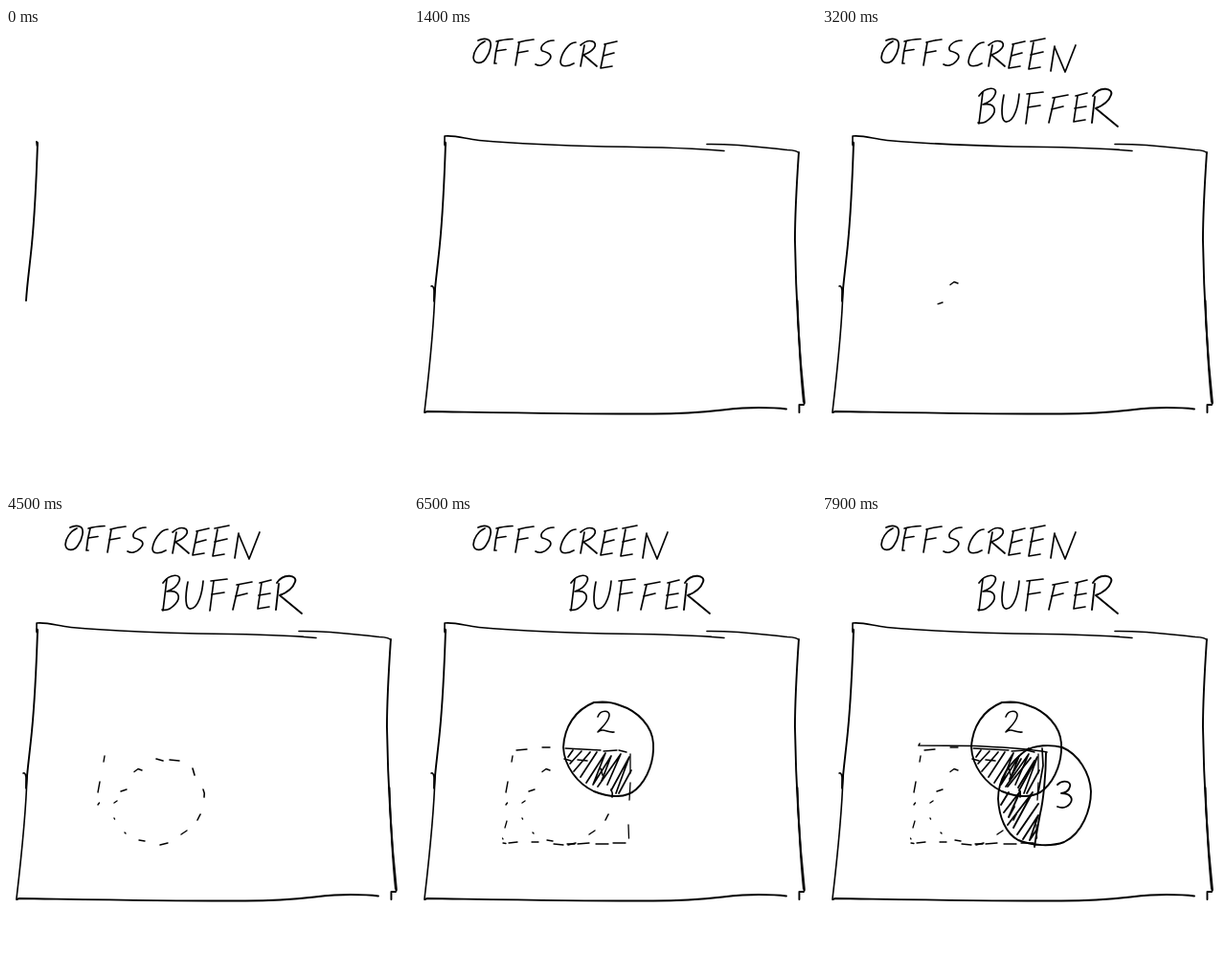
An HTML page for the animation above (8000 ms loop, 420 by 480 pixels).

```html
<!DOCTYPE html>
<html lang="en">
<head>
<meta charset="utf-8">
<title>Offscreen buffer sketch</title>
<style>
  html, body { margin: 0; width: 100%; height: 100%; overflow: hidden; background: #fff; }
  svg { display: block; width: 420px; height: 480px; }
  path { fill: none; stroke: #000; stroke-linecap: round; stroke-linejoin: round; }
</style>
</head>
<body>
<svg id="board" viewBox="0 0 420 480" role="img" aria-label="OFFSCREEN BUFFER"></svg>
<script>
const LOOP = 8000, STEP = 100;

// Each entry: pen down (ms), pen up (ms), line width, strokes in drawing order.
const script = [
  // Frame
  [-100, 0, 1.9, 'M32 119L32.5 123M33 120C32 150 30 195 27 226C25 247 22 268 21 285'],
  [0, 100, 1.6, 'M18 270Q21 269 21 277L21 286M22 272C21 310 16 358 11 401'],
  [100, 200, 1.9, 'M11 402L14 401C80 402 180 404 250 403.500C315 403 325 397 360 397Q378 397 389 398.5'],
  [200, 300, 1.9, 'M402 130C400 160 398 190 398 222C399 280 403 345 408 392L407 394L402.500 394L402.500 402M400.500 285C402 325 404 362 407 391'],
  [300, 400, 1.6, 'M32 122L32 113C45 112 53 116 68 117.500C110 121 155 123 200 124C245 124.500 290 125 324 128.500M306 121.500C340 121 365 125 390 127.500Q401 128 402 131'],
  // First word
  [400, 500, 1.7, 'M74 14C67 17 62 25 62 31C63 38 71 38 75 32C80 25 82 15 78 12.500Q73 10 67 13'],
  [500, 600, 1.7, 'M88 14Q85 25 84 37L86 37M86 14Q93 12 103 11.500M86 24L96 22.500'],
  [600, 700, 1.7, 'M110 15L106 39M109 15Q116 13 125 12M108 26L119 24'],
  [700, 900, 1.7, 'M146 13C137 13 130 20 134 24C142 26 146 29 140 35C136 40 130 40 127 38'],
  [900, 1000, 1.7, 'M169 15C161 15 154 27 153 35C153 42 162 40 167 37'],
  [1000, 1200, 1.7, 'M178 18L174 40M174 18C183 10 193 14 188 21Q184 26 177 28L191 40'],
  [1200, 1400, 1.7, 'M200 17L195 42L207 40M199 17L212 14M198 29L209 26'],
  [1400, 1600, 1.7, 'M221 15L216 43L228 41M218 14L233 11M218 28L231 25'],
  [1600, 1800, 1.7, 'M243 19L239 45M243 20L254 46L265 18'],
  // Second word
  [1800, 1900, 1.7, 'M168 67L164 100M164 71C171 61 184 61 181 69Q178 77 168 80C181 78 183 86 177 93Q170 101 163 99'],
  [1900, 2000, 1.7, 'M190 70C187 85 187 99 193 98C201 97 205 82 206 69'],
  [2000, 2100, 1.7, 'M217 69L213 100M214 69L231 67'],
  [2100, 2200, 1.7, 'M215 83L228 81'],
  [2200, 2400, 1.7, 'M243 73L237 99M241 73L257 70M240 85L252 82'],
  [2400, 2700, 1.7, 'M267 71L263 98L275 96M265 71L277 68M264 84L276 82'],
  [2700, 3000, 1.9, 'M285 72L282 99M283 71C290 60 305 63 302 70Q299 79 286 84L309 103'],
  // Dashed circle
  [3000, 3600, 1.4, 'M142 267L138 265.500L134 268.500M126 287L120 289M116 299L113 301M113 317L113.500 318M124 332L125 333M139 340L145 341M161 345L169 343M183 334L189 330'],
  [3600, 4100, 1.6, 'M200 319L203 313M207 295Q208 291 206 287M197 272L195 265M181 257L171 256M164 257L157 255'],
  // Dashed square
  [4100, 4500, 1.4, 'M102 258L103 252M96 290L98 279M96 303L97.500 301'],
  [4500, 5000, 1.3, 'M95 327L97 320M92.500 338L93 339M93 343L96 343.500M99 343L108 342M123 342L130 342M146 344L156 345M160 344L168 344M171 344L183 343M190 344L203 344M208 343L221 343'],
  [5000, 5400, 1.3, 'M107 246L118 245M134 243L142 243M158 244L195 246M198 247L212 246M214 246L222 248'],
  [5400, 5500, 1.3, 'M226 250L226 270M226 280L225 298M224 324L224.500 338'],
  // First solid circle, its number and shading
  [5500, 5800, 1.9, 'M202 196L188 196C168 204 157 222 156 243C157 263 171 281 188 289C205 296 222 296 232 287C245 275 251 256 250 239C249 221 234 205 215 199Q203 194 189 196'],
  [5800, 6000, 1.6, 'M192 211C195 203 205 204 204 210C203 217 196 222 192 227C198 222 202 228 209 227'],
  [6000, 6500, 1.7, 'M161 253L166 246M163 260L175 247M167 268L184 248M174 274L191 248M180 280L200 249L187 282L206 252L196 278M192 284L216 250L202 282M206 288L225 253L211 291M214 291L227 267'],
  // Second solid circle and its number
  [6500, 6800, 1.9, 'M216 244C196 258 184 275 184 297C185 316 192 333 205 340C220 346 240 347 253 342C272 333 281 308 281 289C280 270 268 250 251 243C240 240 222 240 212 247'],
  [6800, 7000, 1.7, 'M196 276L208 255M230 244L231 262L226 290'],
  [7000, 7200, 1.8, 'M246 282C252 276 261 279 259 284C258 289 253 291 250 291C260 291 263 297 259 302Q254 308 246 305'],
  // Second shading and the corrected edges
  [7200, 7600, 1.9, 'M187 303L195 290M190 311L207 289L195 316L201 305M194 324L220 290L200 327M204 334L226 302M210 339L226 314L217 340L225 328M194 284L218 254M205 285L222 257'],
  [7600, 7700, 1.6, 'M102 239L101 241L160 241.500C190 243 214 244 235 248'],
  [7700, 7900, 1.9, 'M234 249C234 272 231 300 228 312Q224 333 222 347']
];

const board = document.getElementById('board');
const strokes = script.flatMap(([from, to, width, d]) => {
  const parts = d.match(/M[^M]+/g).map(piece => {
    const path = document.createElementNS(board.namespaceURI, 'path');
    path.setAttribute('d', piece);
    path.setAttribute('stroke-width', width);
    board.append(path);
    return { path, length: path.getTotalLength() };
  });
  const total = parts.reduce((sum, p) => sum + p.length, 0);
  let done = 0;
  return parts.map(({ path, length }) => {
    const start = from + (to - from) * done / total;
    done += length;
    return { path, length, start, end: from + (to - from) * done / total };
  });
});

function draw(time) {
  for (const { path, length, start, end } of strokes) {
    const part = Math.min(1, (time - start) / (end - start));
    const full = part > 0.999;
    path.style.visibility = part > 0.001 ? 'visible' : 'hidden';
    path.style.strokeDasharray = full || part <= 0 ? 'none' : `${length * part} ${length + 10}`;
  }
}

let shown = -1;
function tick() {
  const time = Math.floor(performance.now() % LOOP / STEP) * STEP;
  if (time !== shown) draw(shown = time);
  requestAnimationFrame(tick);
}
tick();
</script>
</body>
</html>
```
